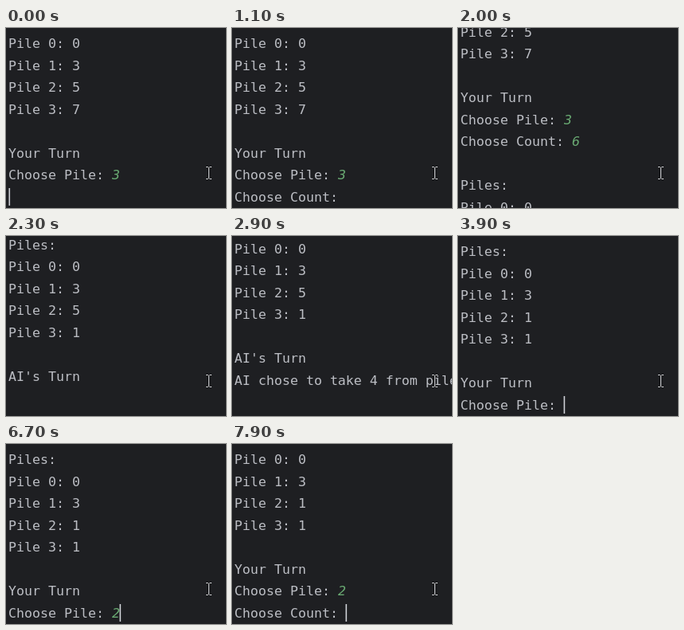
Write an HTML page that moves like this. It is 276 by 226 pixels and loops after 8000 ms.

```html
<!DOCTYPE html>
<html lang="en">
<head>
<meta charset="utf-8">
<title>Pile game console</title>
<style>
  html, body { margin: 0; width: 100%; height: 100%; overflow: hidden; background: #1e1f22; }
  svg { display: block; }
  text { font: 16.6px "DejaVu Sans Mono", "Noto Sans Mono", monospace; fill: #bcbec4; white-space: pre; }
  .input { fill: #6aab73; font-style: italic; }
  #caret { fill: #ced0d6; }
  #pointer { fill: none; }
</style>
</head>
<body>
<svg width="276" height="226" viewBox="0 0 276 226">
  <defs>
    <path id="beam" d="M251 174.5h2.5l1 1 1-1h2.5M254.5 175v14M251 189.5h2.5l1-1 1 1h2.5"/>
  </defs>
  <g id="console"></g>
  <rect id="caret" y="201" width="1.6" height="22"/>
  <g id="pointer">
    <use href="#beam" stroke="#111214" stroke-width="2.4"/>
    <use href="#beam" stroke="#dcdde0"/>
  </g>
</svg>
<script>
const LOOP = 8000, TICK = 100, BLINK = 520;
const PITCH = 27.5, ADVANCE = 9.93;

const box = document.getElementById("console");
const caret = document.getElementById("caret");
const parts = [], moves = [], carets = [];
const counts = [0, 3, 5, 7];
let rows = 0, row;

function add(tag, parent, text, at) {
  const el = document.createElementNS("http://www.w3.org/2000/svg", tag);
  el.textContent = text;
  parts.push({ el, at, line: rows });
  return parent.appendChild(el);
}

// The game session, written as timed console actions
const place = (at, column) => carets.push({ at, column });
const hide = at => place(at, -1);
const roll = (at, distance, duration = 1) => moves.push({ at, distance, duration });

function print(at, ...texts) {
  for (const text of texts) {
    row = add("text", box, text, at);
    row.setAttribute("x", 3);
    rows++;
  }
}

function prompt(at, text) {
  print(at, text);
  place(at, text.length);
}

function type(at, key) {
  add("tspan", row, key, at).setAttribute("class", "input");
  place(at, row.textContent.length);
}

function printPiles(at) {
  print(at, ...counts.map((n, i) => `Pile ${i}: ${n}`), "");
}

printPiles(0);
print(0, "Your Turn");
prompt(0, "Choose Pile: ");
type(0, "3");
place(0, 0);
prompt(100, "Choose Count: ");
type(1500, "6");

hide(1900);
counts[3] -= 6;
print(1900, "", "Piles:");
printPiles(1900);
print(1900, "AI's Turn");
roll(1806, 278.5, 600);
print(2600, "AI chose to take 4 from pile 2");

counts[2] -= 4;
print(3400, "", "Piles:");
printPiles(3400);
roll(3400, 185);
print(3500, "Your Turn");
prompt(3500, "Choose Pile: ");
place(3600, 13);
roll(3500, 31.5);
type(6500, "2");
place(7400, 0);
roll(7400, PITCH);
prompt(7500, "Choose Count: ");

const show = (el, on) => el.setAttribute("visibility", on ? "visible" : "hidden");
const clamp = u => Math.min(1, Math.max(0, u));
const smooth = u => u * u * (3 - 2 * u);

function draw(t) {
  const top = moves.reduce((sum, m) => sum + m.distance * smooth(clamp((t + 1 - m.at) / m.duration)), 0);
  for (const { el, at, line } of parts) {
    show(el, t >= at);
    if (el.tagName === "text") el.setAttribute("y", Math.round(25 + PITCH * line - top));
  }
  const { at, column } = carets.findLast(c => c.at <= t);
  show(caret, column >= 0 && (t - at) % (2 * BLINK) < BLINK);
  caret.setAttribute("x", 3.5 + ADVANCE * column);
}

const start = performance.now();
function frame() {
  const t = (performance.now() - start) % LOOP;
  draw(Math.floor(t / TICK) * TICK);
  requestAnimationFrame(frame);
}
frame();
</script>
</body>
</html>
```
